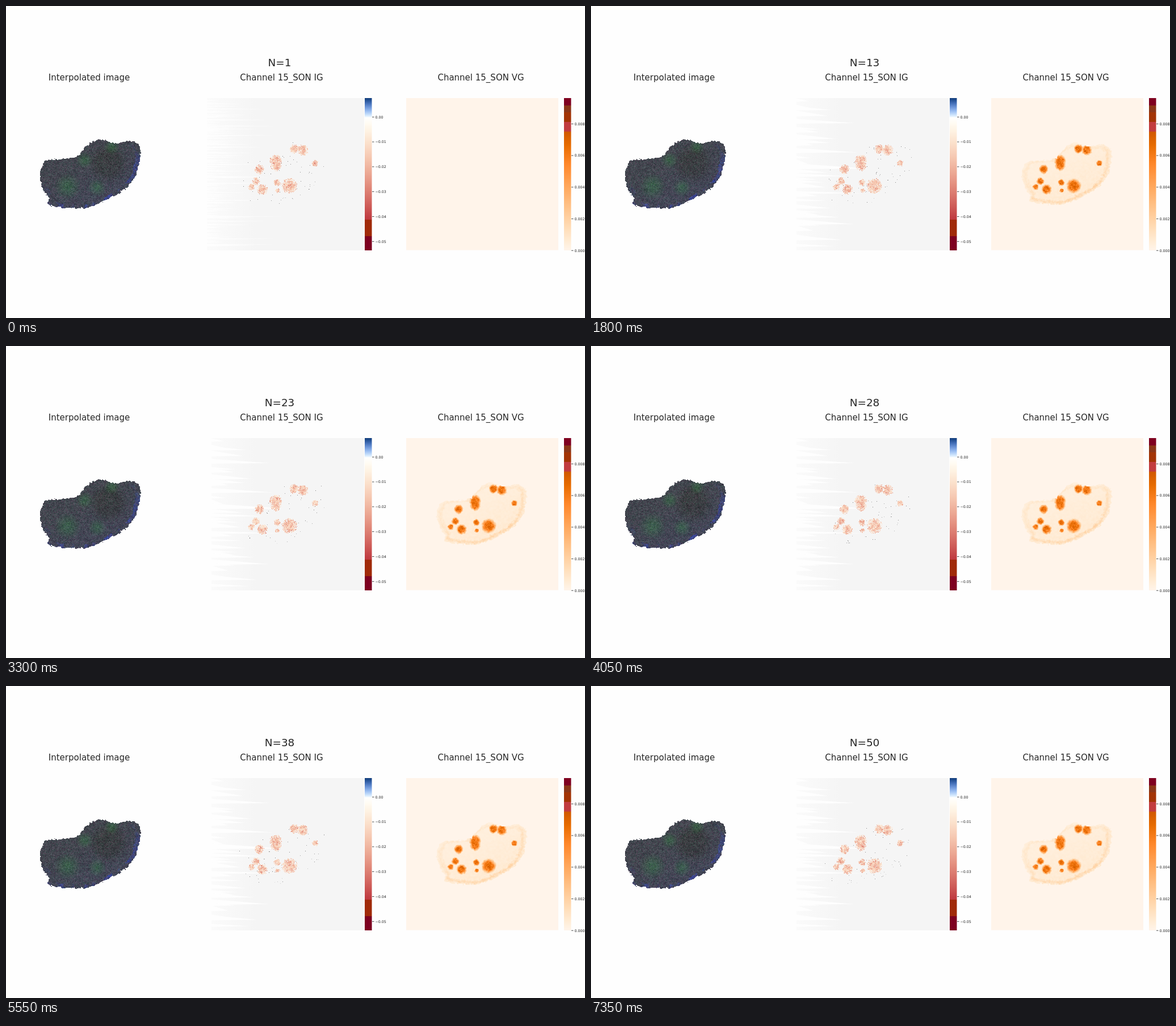
An HTML page with a canvas for the animation above (7.5 s loop, 1020 px wide and 549 px high).

```html
<!DOCTYPE html>
<html lang="en">
<head>
<meta charset="utf-8">
<title>Interpolated image and channel gradients</title>
<style>
html, body { margin: 0; width: 100%; height: 100%; overflow: hidden; background: #fefefe; }
canvas { display: block; }
</style>
</head>
<body>
<canvas id="stage" width="1020" height="549"></canvas>
<script>
const ctx = document.getElementById('stage').getContext('2d');
const STEP = 150, STEPS = 50;
const TOP = 162, SIDE = 268;                // panel geometry
const X0 = 54, Y0 = 230, W = 188, H = 132;  // tile around the cell
const IG_SHIFT = 339, VG_SHIFT = 690;       // panel offsets from the cell

// Key points of the cell, joined by a smooth closed curve
const outline = [
  [59,297], [67,275], [80,270], [124,265], [142,245], [164,235], [190,241],
  [220,238], [235,250], [232,286], [222,307], [204,325], [166,345], [133,355],
  [78,350], [76,338], [66,322]];

// Bright bodies and green haze: x, y, radius
const bodies = [
  [168,251,7], [183,253,8], [136,272,9], [136,280,8], [107,287,7], [101,308,6],
  [93,318,5], [112,322,8], [138,310,5], [160,316,11.5], [139,324,3.5], [205,276,5]];
const haze = [[108,317,19], [138,271,12], [160,319,13], [186,247,11]];
const nucleus = [[180,277,29]];

const clamp = v => Math.max(0, Math.min(1, v));

function hash(x, y, seed) {
  let h = Math.imul(x, 374761393) ^ Math.imul(y, 668265263) ^ Math.imul(seed + 1, 1274126177);
  h = Math.imul(h ^ h >>> 13, 1103515245);
  h = Math.imul(h ^ h >>> 16, 2246822519);
  return ((h ^ h >>> 15) >>> 0) / 4294967296;
}

function noise(x, y, seed) {
  const i = Math.floor(x), j = Math.floor(y), u = x - i, v = y - j;
  const row = k => hash(i, k, seed) * (1 - u) + hash(i + 1, k, seed) * u;
  return row(j) * (1 - v) + row(j + 1) * v;
}

// Colour ramps for values from 0 (pale) to 1 (deep)
function orange(value) {
  const v = clamp(value);
  return [255 - 90 * clamp((v - .6) / .4) ** 1.3, 244 - 190 * v ** 1.15, 234 * clamp(1 - v / .75)];
}
function red(value) {
  const v = clamp(value);
  return [255 - 65 * v * v, 255 - 198 * v ** 1.35, 255 - 191 * v ** .95];
}
function blue(value) {
  const v = clamp(value);
  return [250 - 232 * v ** .8, 252 - 190 * v, 254 - 130 * v * v];
}

function scaledOutline(scale) {
  const path = new Path2D(), size = outline.length;
  const at = (i, k) => {
    const centre = [148, 295][k];
    return centre + (outline[(i + size) % size][k] - centre) * scale;
  };
  path.moveTo(at(0, 0), at(0, 1));
  for (let i = 0; i < size; i++) {
    const out = k => at(i, k) + (at(i + 1, k) - at(i - 1, k)) / 6;
    const back = k => at(i + 1, k) - (at(i + 2, k) - at(i, k)) / 6;
    path.bezierCurveTo(out(0), out(1), back(0), back(1), at(i + 1, 0), at(i + 1, 1));
  }
  return path;
}

// Strongest falloff among a set of discs
function spots(discs, x, y, soft) {
  return Math.max(...discs.map(([cx, cy, r]) =>
    clamp((1.25 - Math.hypot(x - cx, y - cy) / r) / soft)));
}

const cellPath = scaledOutline(1.005), innerPath = scaledOutline(.9);
const rings = Array.from({ length: 6 }, (_, i) => scaledOutline(.9 - i * .026));
const pixels = Array.from({ length: W * H }, (_, i) => {
  const x = X0 + i % W, y = Y0 + Math.floor(i / W);
  const dx = (noise(x / 2.5, y / 2.5, 91) - .5) * 4, dy = (noise(x / 2.5, y / 2.5, 92) - .5) * 4;
  const inside = path => ctx.isPointInPath(path, x + dx, y + dy);
  const depth = rings.filter(inside).length;
  const lower = clamp(.35 + (x - 148) / 160 + (y - 295) / 75);
  return {
    x, y, lower, depth, cell: inside(cellPath),
    rim: Math.min(depth, 7 - depth) / 3 * (.4 + .6 * lower),
    body: spots(bodies, x + dx * .5, y + dy * .5, .6),
    green: spots(haze, x, y, 1),
    blue: inside(innerPath) ? 0 : lower * clamp((noise(x / 7, y / 7, 93) - .4) * 3),
    dark: spots(nucleus, x, y, .6)
  };
});

const tile = new OffscreenCanvas(W, H), tileCtx = tile.getContext('2d');
function drawTile(left, colour) {
  const image = tileCtx.createImageData(W, H);
  pixels.forEach((p, i) => {
    const c = colour(p);
    if (c) image.data.set([...c, 255], i * 4);
  });
  tileCtx.putImageData(image, 0, 0);
  ctx.drawImage(tile, left, Y0);
}

function cellColour(p, n) {
  if (!p.cell) return null;
  const tint = hash(p.x, p.y, n + 200), mix = (tint - .5) * 16;
  const tone = (hash(p.x, p.y, n) - .5) * 28 + (noise(p.x / 2, p.y / 2, n + 100) - .5) * 22 - p.dark * 8;
  const g = p.green * (tint > .4 ? 30 : 10), b = p.blue * (tint < .65 ? 75 : 25);
  return [
    67 + tone - g * .3 - b * .1 + mix,
    70 + tone + g - mix,
    79 + tone - g * .2 + b + (p.lower - p.dark) * 7];
}

function igColour(p, n) {
  const r = hash(p.x, p.y, n + 300), patch = noise(p.x / 3, p.y / 3, n + 400);
  if (p.body > .1 && r < .35 + p.body * .6)
    return red(.12 + p.body * .1 + patch * .35 + (r < .06 ? .3 : 0));
  if (p.depth && r < .003 + p.lower * .004)
    return Array(3).fill(120 + r * 15000);
  return null;
}

function vgColour(p, n) {
  if (n === 1 || !p.depth) return null;
  const grain = (hash(p.x, p.y, n + 500) - .5) * (.08 + .45 / Math.sqrt(n));
  const patch = noise(p.x / 3, p.y / 3, 7) - .5;
  const ring = .025 + p.rim * (.15 + patch * .12 + grain * .3);
  return orange(Math.max(ring, p.body * (.7 + patch * .2 + grain)));
}

function text(s, x, y, size, align = 'center') {
  ctx.font = `${size}px "DejaVu Sans", sans-serif`;
  ctx.textAlign = align;
  ctx.fillStyle = '#262626';
  ctx.fillText(s, x, y);
}

// Bars take a colour for each height t, from 0 at the top to 1 at the bottom
function igBar(t) {
  if (t > .905) return [125, 0, 32];
  if (t > .797) return [160, 42, 9];
  return t < .125 ? blue(1 - t / .125) : red((t - .125) / .67);
}
function vgBar(t) {
  if (t < .045) return [127, 0, 32];
  if (t < .09) return [140, 54, 24];
  if (t < .155) return [163, 52, 6];
  if (t < .22) return [194, 60, 63];
  return orange((1 - t) * 1.08);
}

function colourBar(x, colour, ticks, label, first, gap) {
  for (let i = 0; i < SIDE; i++) {
    ctx.fillStyle = `rgb(${colour(i / SIDE).map(Math.round)})`;
    ctx.fillRect(x, TOP + i, 12.5, 1);
  }
  for (let i = 0; i < ticks; i++) {
    const y = first + i * gap;
    ctx.fillStyle = '#262626';
    ctx.fillRect(x + 13, y - .4, 3.5, .8);
    text(label(i), x + 18.5, y + 2.3, 6.3, 'left');
  }
}

// Pale grey panel that frays into white streaks on its left side
function greyPanel(n) {
  const fine = n === 1, count = fine ? 90 : 34, left = fine ? 354 : 362;
  const fill = ctx.createLinearGradient(354, 0, 440, 0);
  fill.addColorStop(0, '#fbfbfb');
  fill.addColorStop(1, '#f5f5f5');
  ctx.fillStyle = fill;
  ctx.fillRect(left, TOP, 631 - left, SIDE);
  ctx.fillStyle = '#fefefe';
  for (let i = 0; i < count; i++) {
    const y = TOP + 4 + (i + hash(i, 1, 5)) * 258 / count;
    const thick = fine ? 1 : 3 + hash(i, 2, 5) * 6;
    ctx.beginPath();
    ctx.moveTo(left, y - thick);
    ctx.lineTo(left + 20 + hash(i, 3, 5) ** 2 * 115, y);
    ctx.lineTo(left, y + 1);
    ctx.fill();
  }
}

function draw(n) {
  ctx.fillStyle = '#fefefe';
  ctx.fillRect(0, 0, 1020, 549);
  text('N=' + n, 482, 105.5, 18.4);
  text('Interpolated image', 146.5, 131, 15);
  text('Channel 15_SON IG', 485.5, 131, 15);
  text('Channel 15_SON VG', 836.5, 131, 15);

  greyPanel(n);
  ctx.fillStyle = '#fff4ea';
  ctx.fillRect(705, TOP, SIDE, SIDE - .5);

  drawTile(X0, p => cellColour(p, n));
  drawTile(X0 + IG_SHIFT, p => igColour(p, n));
  drawTile(X0 + VG_SHIFT, p => vgColour(p, n));

  colourBar(632, igBar, 6, i => (i ? '−' : '') + (i / 100).toFixed(2), 195.3, 43.8);
  colourBar(983, vgBar, 5, i => (.008 - i * .002).toFixed(3), 207.4, 55.7);
}

let shown = 0;
const start = performance.now();
function tick() {
  const n = 1 + Math.floor((performance.now() - start) / STEP) % STEPS;
  if (n !== shown) draw(shown = n);
  requestAnimationFrame(tick);
}
tick();
</script>
</body>
</html>
```
